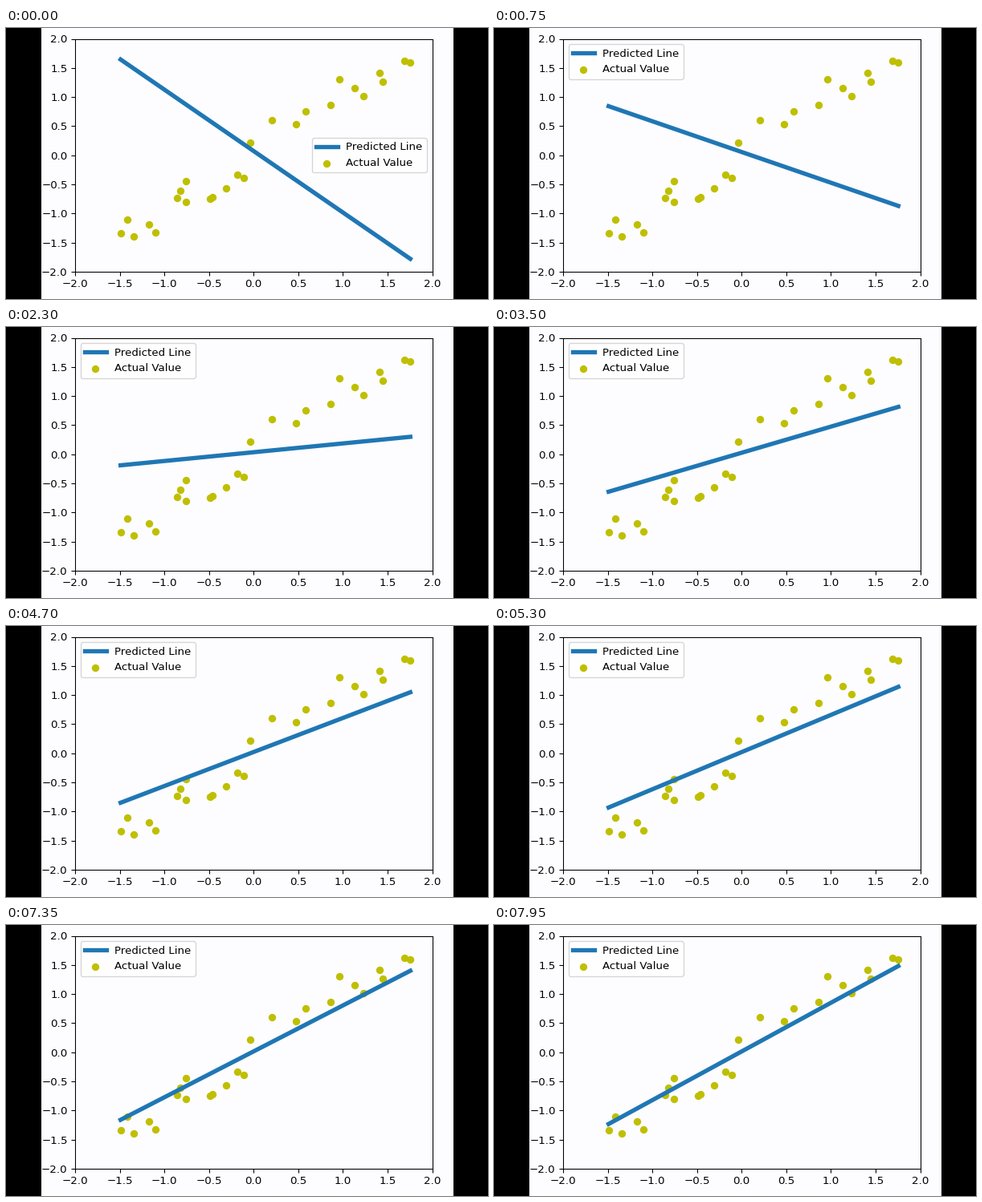
Write a matplotlib script that moves like this. It is 600 px wide and 338 px high and loops after 8000 ms.

```python
import matplotlib.pyplot as plt
import numpy as np
from matplotlib.animation import FuncAnimation

WIDTH, HEIGHT, DPI = 600, 338, 96
FRAMES, INTERVAL = 160, 50
PAGE = "#fdfcfe"

X = np.array([-1.49, -1.415, -1.34, -1.17, -1.10, -0.86, -0.825, -0.755, -0.755,
              -0.485, -0.46, -0.31, -0.18, -0.11, -0.04, 0.205, 0.475, 0.585,
              0.86, 0.96, 1.135, 1.235, 1.41, 1.45, 1.69, 1.755])
Y = np.array([-1.34, -1.105, -1.395, -1.19, -1.32, -0.735, -0.61, -0.44, -0.80,
              -0.745, -0.715, -0.57, -0.335, -0.39, 0.22, 0.605, 0.535, 0.755,
              0.865, 1.305, 1.155, 1.015, 1.415, 1.265, 1.615, 1.595])

# Frames on which each new descent step appears; most follow one blank frame.
STEP_FRAMES = [3, 10, 17, 25, 32, 41, 51, 60, 70, 79, 88, 99, 109, 118,
               130, 139, 149, 158]
NO_BLANK = {118}
BLANK_FRAMES = {f - 1 for f in STEP_FRAMES if f not in NO_BLANK}

# Gradient descent shrinks the error by a constant factor per step.
DECAY = 0.86
FINAL_SLOPE, SLOPE_ERROR = 0.97, -2.025
FINAL_BIAS, BIAS_ERROR = 0.01, 0.063


def predict(step):
    shrink = DECAY ** step
    slope = FINAL_SLOPE + SLOPE_ERROR * shrink
    bias = FINAL_BIAS + BIAS_ERROR * shrink
    return slope * X + bias


def pixel_box(left, top, right, bottom):
    return [left / WIDTH, 1 - bottom / HEIGHT,
            (right - left) / WIDTH, (bottom - top) / HEIGHT]


plt.rcParams["font.family"] = "DejaVu Sans"
fig = plt.figure(figsize=(WIDTH / DPI, HEIGHT / DPI), dpi=DPI, facecolor="black")

page = fig.add_axes(pixel_box(43.5, 0, 556.5, HEIGHT), facecolor=PAGE, zorder=-1)
page.set(xticks=[], yticks=[])
for spine in page.spines.values():
    spine.set_visible(False)

ax = fig.add_axes(pixel_box(86, 13.5, 530.5, 304), facecolor=PAGE)
ticks = np.arange(-2, 2.1, 0.5)
ax.set(xlim=(-2, 2), ylim=(-2, 2), xticks=ticks, yticks=ticks)
line, = ax.plot(X, predict(0), color="#1f77b4", lw=4, label="Predicted Line")
ax.scatter(X, Y, color="y", label="Actual Value")
legend = ax.legend(loc="center right")


def update(frame):
    step = sum(start <= frame for start in STEP_FRAMES)
    ax.set_visible(frame not in BLANK_FRAMES)
    line.set_ydata(predict(step))
    legend.set_loc("center right" if step == 0 else "upper left")
    return line, legend


anim = FuncAnimation(fig, update, frames=FRAMES, interval=INTERVAL,
                     init_func=lambda: update(0), repeat=True, repeat_delay=0)
plt.show()
```
